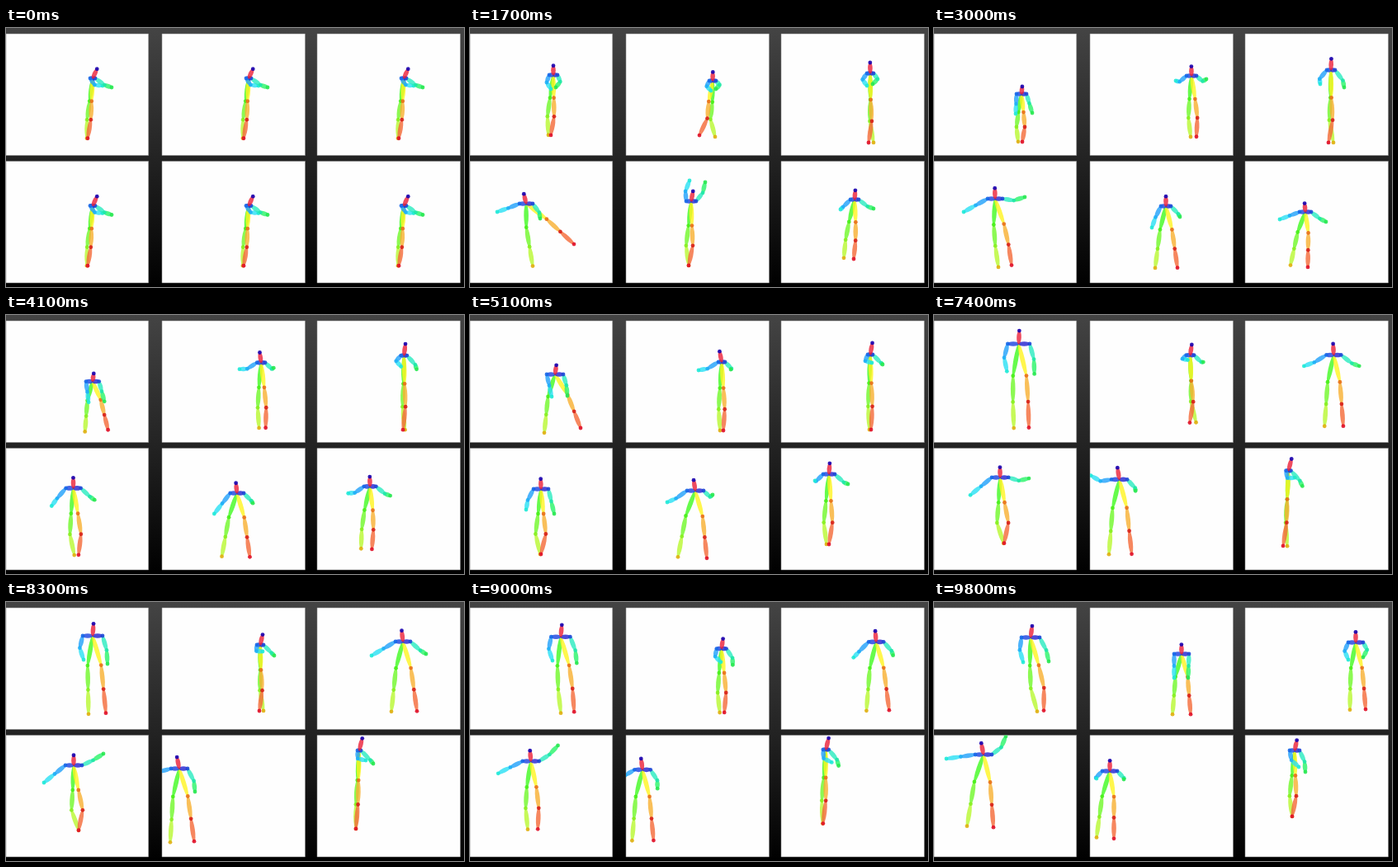
Animation, 555 px wide and 314 px high, one loop 9900 ms. Source, as an HTML page with a canvas:

```html
<!DOCTYPE html>
<html lang="en">
<head>
<meta charset="utf-8">
<title>Six dancing skeletons</title>
<style>
  html, body { margin: 0; width: 100%; height: 100%; overflow: hidden; background: #000; }
  canvas { display: block; }
</style>
</head>
<body>
<canvas width="555" height="314"></canvas>
<script>
const LOOP = 9900, STEP = 100;
const beats = [600, 1700, 3000, 5100, 6400, 8300, 9800];
const ctx = document.querySelector('canvas').getContext('2d');
const dancers = [];

// Every dancer starts from the same side-on pose, then follows its own key poses.
// Pose: neck x, y, shoulder half-width, height, then as offsets from the neck:
// left hand x, y, right hand x, y, left foot x, right foot x.
function routine(...poses) {
  const n = dancers.length;
  const left = [0, 189, 377][n % 3], top = n < 3 ? 7 : 161.5;
  const opening = [left + 105, top + 54, 3, 73, 12, 9, 23, 11, -7, -6];
  dancers.push({ left, top, poses: [opening, ...poses] });
}

routine(
  [101, 57, 5, 73, -3, 17, 3, 15, -6, -3],
  [106, 80, 6, 58, -7, 24, 13, 23, -4, 1],
  [103, 72, 10, 72, -4, 27, 15, 26, -13, 31],
  [102, 34, 14, 105, -16, 37, 20, 37, -6, 11],
  [105, 41, 12, 95, -11, 29, 18, 34, -5, 16],
  [117, 43, 11, 90, -9, 30, 22, 29, 8, 16]);
routine(
  [294, 64, 4, 68, -2, 12, 4, 10, 3, -16],
  [312, 58, 6, 74, -19, 6, 18, 4, -1, 6],
  [305, 57, 4, 83, -28, 10, 11, 9, -2, 2],
  [311, 48, 6, 83, -14, 7, 13, 6, 7, 2],
  [308, 52, 4, 80, 3, 8, 17, 13, 4, -1],
  [300, 63, 9, 74, -9, 29, 8, 29, -11, 11]);
routine(
  [485, 55, 4, 84, -4, 15, 3, 13, 4, -2],
  [481, 51, 5, 88, -13, 17, 16, 21, 3, -3],
  [485, 48, 3, 91, 2, 10, 15, 12, -1, 1],
  [492, 49, 8, 88, -25, 10, 29, 12, -6, 4],
  [481, 48, 9, 86, -38, 17, 28, 15, -14, 17],
  [511, 49, 9, 82, -9, 21, 9, 18, -7, 12]);
routine(
  [68, 213, 8, 76, -35, 10, 17, 18, 8, 58],
  [74, 207, 9, 83, -38, 16, 36, -2, 4, 20],
  [86, 211, 9, 79, -18, 25, 16, 30, -1, 0],
  [76, 196, 10, 82, -35, 20, 30, 19, -2, 4],
  [82, 198, 10, 79, -36, 21, 36, -14, 6, 6],
  [60, 185, 10, 89, -45, 5, 27, -22, -20, 12]);
routine(
  [268, 210, 6, 78, -2, -25, 17, -23, -3, -3],
  [281, 216, 6, 76, -17, 26, 17, 13, -13, 14],
  [273, 213, 10, 83, -34, 14, 21, 5, -21, 14],
  [246, 199, 9, 91, -28, -6, 20, -4, -16, 10],
  [210, 202, 10, 90, -38, 0, 19, 28, -11, 18],
  [213, 205, 9, 82, -16, 9, 17, 10, -16, 5]);
routine(
  [466, 208, 5, 72, -17, 12, 23, 11, -13, -1],
  [450, 223, 7, 67, -31, 9, 25, 12, -18, 3],
  [435, 193, 7, 85, -17, 8, 23, 12, -3, 0],
  [433, 198, 5, 85, 4, 6, 17, 22, 1, -8],
  [428, 180, 2, 95, 8, 12, 17, 16, -4, -4],
  [437, 180, 6, 80, 5, 20, 13, 26, -3, -3]);

// Smooth path through the key poses, held until the first beat.
function poseAt(poses, time) {
  if (time <= beats[0]) return poses[0];
  const i = beats.findIndex(beat => time <= beat), last = beats.length - 1;
  const before = Math.max(i - 2, 0), after = Math.min(i + 1, last);
  const span = beats[i] - beats[i - 1], u = (time - beats[i - 1]) / span;
  return poses[i - 1].map((p, k) => {
    const q = poses[i][k];
    const leave = (q - poses[before][k]) * span / (beats[i] - beats[before]);
    const arrive = (poses[after][k] - p) * span / (beats[after] - beats[i - 1]);
    return p + (q - p) * u * u * (3 - 2 * u) + leave * u * (1 - u) ** 2 - arrive * u * u * (1 - u);
  });
}

function limb([x1, y1], [x2, y2], color) {
  ctx.globalAlpha = 0.8;
  ctx.fillStyle = color;
  ctx.beginPath();
  ctx.ellipse((x1 + x2) / 2, (y1 + y2) / 2, Math.hypot(x2 - x1, y2 - y1) / 2 + 0.5, 2.8,
    Math.atan2(y2 - y1, x2 - x1), 0, 2 * Math.PI);
  ctx.fill();
}

function joint([x, y], color) {
  ctx.globalAlpha = 0.9;
  ctx.fillStyle = color;
  ctx.beginPath();
  ctx.arc(x, y, 2.4, 0, 2 * Math.PI);
  ctx.fill();
}

// Consecutive joints joined by limbs, each joint given its own colour.
function chain(points, limbColors, jointColors) {
  limbColors.forEach((color, i) => limb(points[i], points[i + 1], color));
  jointColors.forEach((color, i) => joint(points[i + 1], color));
}

function leg(neck, side, width, height, footX, spread) {
  const footY = Math.sqrt(height ** 2 - footX ** 2);
  const hip = [neck[0] + 0.38 * footX + side * 0.35 * width, neck[1] + 0.38 * footY];
  const foot = [neck[0] + footX, neck[1] + footY];
  const bow = side * Math.max(0, 5 - spread / 4) * width / 10;
  return [neck, hip, [(hip[0] + foot[0]) / 2 + bow, (hip[1] + foot[1]) / 2], foot];
}

// A short reach bends the elbow outwards and down.
function arm(neck, side, width, height, handX, handY) {
  const dx = handX - side * width, reach = Math.hypot(dx, handY) || 1;
  const bend = 0.38 * Math.sqrt(Math.max(0, (0.19 * height) ** 2 - reach ** 2 / 4)) / reach;
  const shoulder = [neck[0] + side * width, neck[1]];
  const elbow = [
    shoulder[0] + dx / 2 + side * bend * Math.abs(handY),
    neck[1] + handY / 2 + bend * Math.abs(dx)
  ];
  return [neck, shoulder, elbow, [neck[0] + handX, neck[1] + handY]];
}

function drawSkeleton([x, y, width, height, lx, ly, rx, ry, footL, footR]) {
  const neck = [x, y], head = [x + 0.15 * (lx + rx), y - 0.155 * height];
  const spread = footR - footL;
  chain(leg(neck, -1, width, height, footL, spread),
    ['#40fa20', '#70f828', '#b8f830'], ['#48f018', '#88f020', '#e0b010']);
  chain(leg(neck, 1, width, height, footR, spread),
    ['#fff420', '#f8b030', '#f46a38'], ['#e87018', '#d82018', '#e01028']);
  chain(arm(neck, -1, width, height, lx, ly),
    ['#1840e0', '#20a0fa', '#28e0f4'], ['#1868e8', '#20b0f8', '#20ead8']);
  chain(arm(neck, 1, width, height, rx, ry),
    ['#2020d0', '#28ecc0', '#28f468'], ['#2048d8', '#20e8a8', '#28e850']);
  limb(neck, head, '#ec2038');
  joint(head, '#1800b0');
}

const backdrop = ctx.createLinearGradient(0, 0, 0, 314);
backdrop.addColorStop(0, '#444');
backdrop.addColorStop(0.5, '#232323');
backdrop.addColorStop(1, '#000');

function draw() {
  const time = Math.floor(performance.now() % LOOP / STEP) * STEP;
  ctx.fillStyle = backdrop;
  ctx.fillRect(0, 0, 555, 314);
  for (const { left, top, poses } of dancers) {
    ctx.save();
    ctx.beginPath();
    ctx.rect(left, top, left ? 173.5 : 172.7, 147.5);
    ctx.fillStyle = '#fefefe';
    ctx.fill();
    ctx.strokeStyle = '#8888';
    ctx.stroke();
    ctx.clip();
    drawSkeleton(poseAt(poses, time));
    ctx.restore();
  }
  requestAnimationFrame(draw);
}
draw();
</script>
</body>
</html>
```
